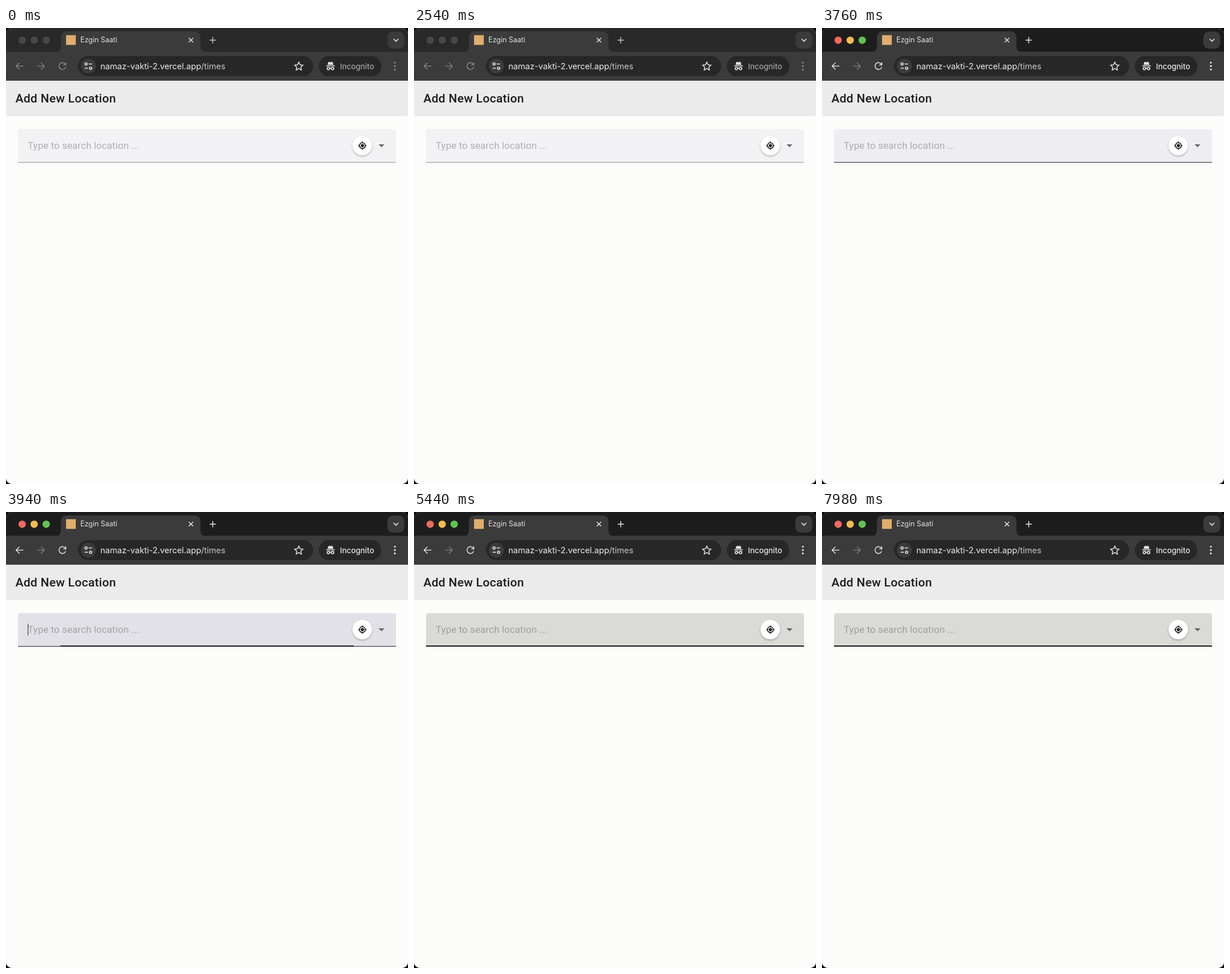
An HTML page that plays this animation: 703 px wide and 796 px high, repeating every 8 s.

```html
<!DOCTYPE html>
<html lang="en">
<head>
<meta charset="utf-8">
<title>Add New Location</title>
<style>
  html, body { margin: 0; width: 100%; height: 100%; overflow: hidden; background: #000; }
  svg { display: block; width: 703px; height: 796px; }
  .ui { font-family: Inter, "Open Sans", sans-serif; }
  .app { font-family: Roboto, sans-serif; }
  .solid { fill: currentColor; }
  .line { fill: none; stroke: currentColor; stroke-width: 1.6; }

  /* Window gains focus */
  .wake { animation: wake 8s step-end infinite; }
  .strip { --dim: #292929; --lit: #1d1d1e; }
  .icon { --dim: #858585; --lit: #dcdcdc; }
  .label { --dim: #a2a2a2; --lit: #e6e6e6; }
  .light { --dim: #484848; }
  @keyframes wake {
    0% { color: var(--dim); }
    37.5% { color: var(--lit); }
  }

  /* Field: hover, then focus */
  .field { animation: field 8s linear infinite; }
  @keyframes field {
    0%, 46.9% { fill: #f2f2f5; }
    47.1%, 48.1% { fill: #eae9ed; }
    49.25%, 50.45% { fill: #e2e1e7; }
    50.5%, 100% { fill: #dadad7; }
  }
  .rule { animation: rule 8s step-end infinite; }
  @keyframes rule {
    0% { fill: #919194; }
    46.9% { fill: #252528; }
  }
  .ripple {
    transform-origin: 351.5px 234px;
    animation: ripple 8s linear infinite;
  }
  @keyframes ripple {
    0%, 48.1% { transform: scaleX(0); }
    49.25%, 50.45% { transform: scaleX(.776); }
    50.5%, 100% { transform: scaleX(1); }
  }
  .focused { animation: focused 8s step-end infinite; }
  @keyframes focused {
    0% { opacity: 0; }
    48.1% { opacity: 1; }
  }
  .caret { animation: blink calc(8s / 9) -594ms step-end infinite; }
  @keyframes blink {
    0% { opacity: 1; }
    50% { opacity: 0; }
  }
</style>
</head>
<body>
<svg viewBox="0 0 703 796">
  <defs>
    <clipPath id="window"><rect width="703" height="796" rx="10"/></clipPath>
    <filter id="shadow" x="-30%" y="-30%" width="160%" height="170%">
      <feDropShadow dx="0" dy="1.5" stdDeviation="1.6" flood-opacity=".32"/>
    </filter>
  </defs>
  <g clip-path="url(#window)">
    <rect width="703" height="796" fill="#fcfcfb"/>

    <!-- Tab strip -->
    <rect class="solid wake strip" width="703" height="43"/>
    <g class="solid">
      <circle class="wake light" style="--lit:#ed6a5e" cx="28.3" cy="21.3" r="6.4"/>
      <circle class="wake light" style="--lit:#f5bd4f" cx="49.3" cy="21.3" r="6.4"/>
      <circle class="wake light" style="--lit:#61c454" cx="70.3" cy="21.3" r="6.4"/>
    </g>
    <path fill="#3b3b3c" d="M86 42q10 0 10-10V17q0-11 11-11h222q11 0 11 11v15q0 10 10 10z"/>
    <rect x="105" y="12.5" width="17" height="17" fill="#dfaf6c"/>
    <text class="ui" x="130" y="25.3" font-size="12.4" fill="#e4e4e4">Ezgin Saati</text>
    <g class="line" color="#e0e0e0">
      <path d="M319.6 17.2l7.8 7.8m0-7.8l-7.8 7.8"/>
      <path class="wake" style="--dim:#c2c2c2;--lit:#dedede" d="M356 21.2h11m-5.5-5.5v11"/>
    </g>
    <rect x="667" y="6.5" width="29.5" height="29.5" rx="9" fill="#3b3b3c"/>
    <path class="line" color="#e6e6e6" stroke-width="1.8" d="M677.7 19l4.2 4.1 4.2-4.1"/>

    <!-- Toolbar -->
    <rect y="41.5" width="703" height="50.5" fill="#3b3b3c"/>
    <g class="line wake icon">
      <path d="M30.3 66.5h-12.500m5.900-6l-6 6 6 6"/>
      <path d="M103.800 63.200a6 6 0 1 0 .6 5.200m.1-8.300v4.400h-4.400"/>
    </g>
    <path class="line wake" style="--dim:#777;--lit:#777" d="M54.500 66.500h12.500m-5.900-6l6 6-6 6"/>
    <rect x="126" y="49" width="411" height="35" rx="17.500" fill="#272727"/>
    <circle cx="144" cy="66.500" r="13" fill="#3b3b3c"/>
    <g class="line" color="#e2e2e2">
      <circle cx="140" cy="62.700" r="2"/>
      <circle cx="148" cy="70.300" r="2"/>
      <path d="M144.500 62.700h6m-13 7.600h6"/>
    </g>
    <text class="ui" x="165" y="71.800" font-size="14.550" fill="#ececec">namaz-vakti-2.vercel.app<tspan fill="#c7c7c7">/times</tspan></text>
    <path class="line" color="#d6d6d6" stroke-linejoin="round" d="M512 59.300l2.200 4.900 5.300.5-4 3.600 1.200 5.300-4.700-2.800-4.700 2.800 1.200-5.300-4-3.600 5.300-.5z"/>
    <rect x="547" y="49" width="109.500" height="35" rx="17.500" fill="#272727"/>
    <g color="#e6e6e6">
      <path class="solid" d="M560 65.300h15v1.500h-15zM562.300 64.200l1.700-5.200q3.500 1 7 0l1.700 5.200z"/>
      <path class="line" stroke-width="1.500" d="M566 70.500q1.500-.8 3 0"/>
      <circle class="line" cx="563.800" cy="70.800" r="2.200"/>
      <circle class="line" cx="571.200" cy="70.800" r="2.200"/>
    </g>
    <text class="ui solid wake label" x="584" y="71.600" font-size="13.400" font-weight="500">Incognito</text>
    <g class="solid wake icon">
      <circle cx="680" cy="60.600" r="1.700"/>
      <circle cx="680" cy="66.500" r="1.700"/>
      <circle cx="680" cy="72.400" r="1.700"/>
    </g>

    <!-- Page header -->
    <path fill="#ebebeb" d="M0 92h703v58q0 4-4 4H4q-4 0-4-4z"/>
    <text class="app" x="16.500" y="130" font-size="21" font-weight="500" letter-spacing=".26" fill="#1b1b1f">Add New Location</text>

    <!-- Search field -->
    <path class="field" d="M21 235v-54.500q0-4 4-4h653q4 0 4 4V235z"/>
    <rect class="rule" x="21" y="234" width="661" height="1"/>
    <rect class="ripple" x="21" y="233" width="661" height="2" fill="#17161b"/>
    <text class="app" x="38" y="211" font-size="16.800" letter-spacing=".157" fill="#000" fill-opacity=".28">Type to search location ...</text>
    <g class="focused"><rect class="caret" x="38" y="195" width="1" height="20.500" fill="#222"/></g>
    <circle cx="623" cy="205.300" r="17" fill="#fff" filter="url(#shadow)"/>
    <g color="#1a1a1c">
      <circle class="line" cx="623.200" cy="205.300" r="5.100" stroke-width="1.400"/>
      <circle class="solid" cx="623.200" cy="205.300" r="2.800"/>
      <path class="line" stroke-width="1.400" d="M623.200 198v2.500m0 9.600v2.500M615.900 205.300h2.500m9.600 0h2.500"/>
    </g>
    <path fill="#000" fill-opacity=".54" d="M651.400 203h10.600l-5.300 5.300z"/>
  </g>
</svg>
</body>
</html>
```
